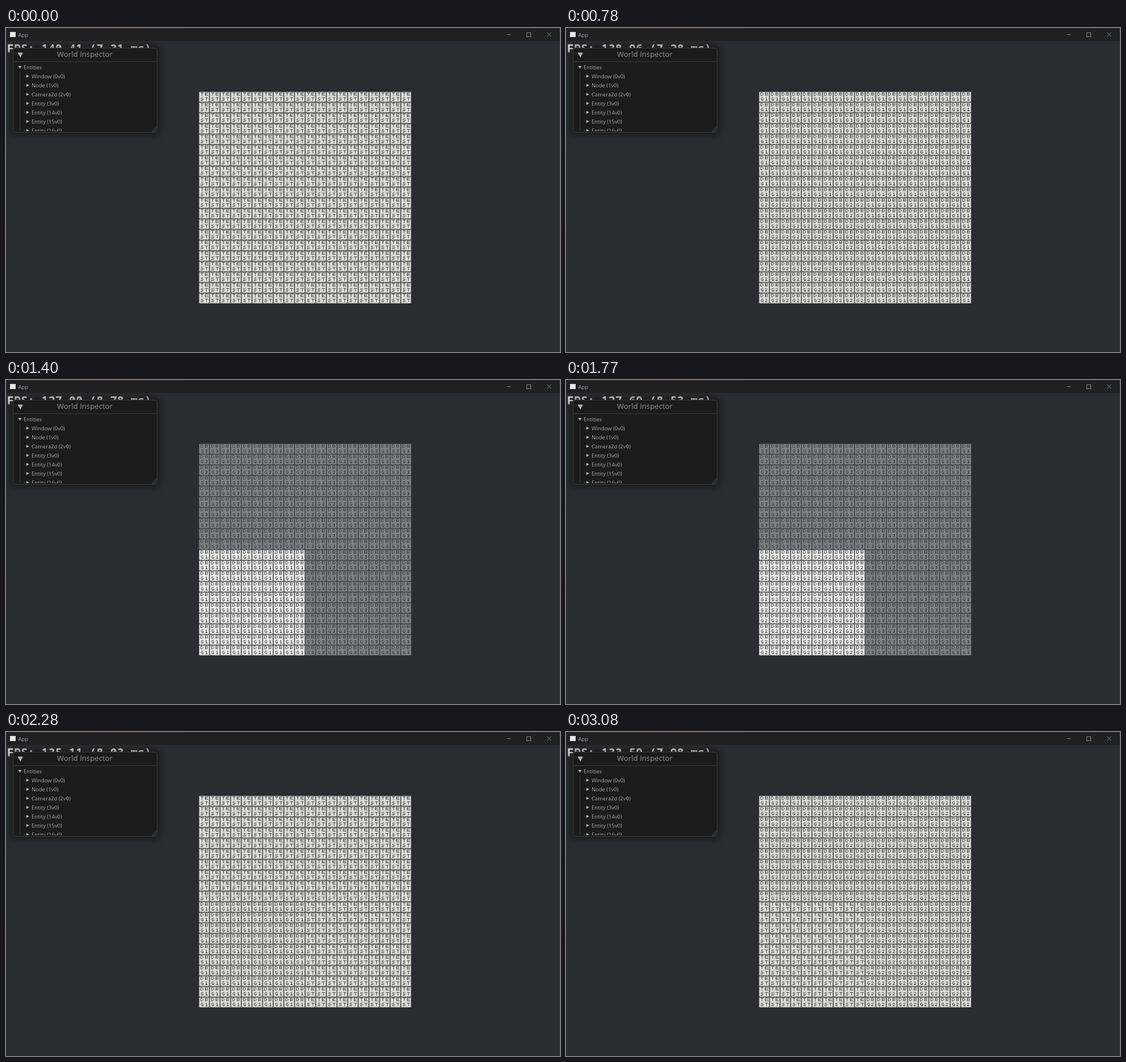
Write an HTML page with a canvas that moves like this. It is 977x573 px and loops after 3100 ms.

```html
<!DOCTYPE html>
<html lang="en">
<head>
<meta charset="utf-8">
<title>App</title>
<style>
  html, body { margin: 0; width: 100%; height: 100%; overflow: hidden; background: #2b2c2f; }
  canvas { display: block; }
</style>
</head>
<body>
<canvas id="stage" width="977" height="573"></canvas>
<script>
const ctx = document.getElementById('stage').getContext('2d');
const LOOP = 3100, PHASE = 130;
const GRID = 20, PITCH = 18.75, TEXEL = PITCH / 24, LEFT = 340, TOP = 112.5;
const UI = '"Open Sans", sans-serif', MONO = '"Noto Sans Mono", monospace';

// Seven rows per glyph, drawn on the 24 x 24 texels of a tile
const GLYPHS = {
  T: ['#######', '   #', '   #', '   #', '   #', '   #', '   #'],
  E: ['#######', '#', '#', '######', '#', '#', '#######'],
  S: ['  ####', ' #', ' #', '  ###', '     #', '     #', '#####'],
  D: ['####', '#   #', '#    #', '#    #', '#    #', '#   #', '####'],
  B: ['#####', '#    #', '#    #', '#####', '#    #', '#    #', '#####'],
  G: ['  ####', ' #', ' #', ' #  ##', ' #   #', ' #   #', '  ####'],
  1: ['  ##', ' # #', '   #', '   #', '   #', '   #', ' #####'],
  2: [' ###', '#   #', '    #', '   #', '  #', ' #', '#####'],
  3: [' ####', ' #  #', '    #', '  ###', '    #', ' #  #', ' ####']
};
const LABELS = ['TEST', 'DBG1', 'DBG2', 'DBG3'];

// k (tenths of a second), frames per second, frame time in ms
const READINGS = [
  [0, 140.41, 7.31], [8, 138.96, 7.28], [13, 124.75, 9.05], [18, 127.69, 8.53],
  [23, 135.11, 8.03], [28, 124.80, 8.88], [31, 133.59, 7.98]
];

function rect(x, y, w, h, color) {
  ctx.fillStyle = color;
  ctx.fillRect(x, y, w, h);
}

function line(color, ...points) {
  ctx.strokeStyle = color;
  ctx.lineWidth = 1;
  ctx.beginPath();
  for (let i = 0; i < points.length; i += 2) ctx.lineTo(points[i], points[i + 1]);
  ctx.stroke();
}

function triangle(color, ...points) {
  ctx.fillStyle = color;
  ctx.beginPath();
  for (let i = 0; i < 6; i += 2) ctx.lineTo(points[i], points[i + 1]);
  ctx.fill();
}

function label(text, x, y, size, color, family = UI, weight = 400) {
  ctx.font = `${weight} ${size}px ${family}`;
  ctx.fillStyle = color;
  ctx.fillText(text, x, y);
}

function fpsText(k) {
  const next = Math.max(1, READINGS.findIndex(r => r[0] >= k));
  const a = READINGS[next - 1], b = READINGS[next];
  const u = (k - a[0]) / (b[0] - a[0]);
  const wobble = Math.sin(Math.PI * u) * Math.sin(k * 2.3);
  const fps = a[1] + (b[1] - a[1]) * u + 4 * wobble;
  const ms = a[2] + (b[2] - a[2]) * u - 0.4 * wobble;
  return `FPS: ${fps.toFixed(2)} (${ms.toFixed(2)} ms)`;
}

function drawWindow() {
  rect(0, 0, 977, 573, '#2b2c2f');
  rect(0, 0, 977, 23, '#202020');
  const top = ctx.createLinearGradient(0, 0, 320, 0);
  top.addColorStop(0, '#2c2626');
  top.addColorStop(0.6, '#4a2424');
  top.addColorStop(1, '#2a2a2a');
  rect(0, 0, 977, 1, top);
  const edge = ctx.createLinearGradient(0, 0, 0, 573);
  [[0, '#303030'], [0.1, '#26393c'], [0.35, '#243844'], [0.57, '#2a323c'],
   [0.61, '#472b2e'], [0.72, '#3e2b2d'], [0.74, '#303134'], [1, '#303134']]
    .forEach(([at, color]) => edge.addColorStop(at, color));
  rect(0, 0, 1, 573, edge);
  rect(976, 0, 1, 573, '#37383a');

  rect(7, 7, 10, 9, '#e4e6e5');
  label('App', 22, 15.5, 9.2, '#a0a0a0');
  line('#858585', 883, 11.5, 890, 11.5);
  ctx.strokeRect(918.5, 8.5, 7, 7);
  line('#858585', 954.5, 8, 961.5, 15);
  line('#858585', 961.5, 8, 954.5, 15);
}

// Soft halo only: the shape itself lies off the stage
function drawHalo(x, y, w, h, spread) {
  ctx.save();
  ctx.shadowColor = 'rgba(0,0,0,.38)';
  ctx.shadowBlur = spread;
  ctx.shadowOffsetX = 2000;
  ctx.fillStyle = '#000';
  ctx.beginPath();
  ctx.roundRect(x - 2000 - spread / 2, y - spread / 2, w + spread, h + spread, 10);
  ctx.fill();
  ctx.restore();
}

function drawInspector() {
  ctx.save();
  ctx.beginPath();
  ctx.rect(0, 23, 977, 550);
  ctx.clip();
  drawHalo(12.5, 35.5, 254, 149, 12);
  ctx.fillStyle = '#1b1b1b';
  ctx.strokeStyle = '#3c3c3c';
  ctx.lineWidth = 1;
  ctx.beginPath();
  ctx.roundRect(12.5, 35.5, 254, 149, 5);
  ctx.fill();
  ctx.stroke();

  triangle('#b4b4b4', 20.5, 43.5, 30, 43.5, 25.2, 52);
  ctx.textAlign = 'center';
  label('World Inspector', 139, 51, 13.2, '#929292');
  ctx.textAlign = 'left';
  line('#3c3c3c', 13, 59.5, 266, 59.5);
  for (const d of [3, 6, 9]) line('#4c4c4c', 266 - d, 183.5, 265.5, 184 - d);

  ctx.beginPath();
  ctx.rect(13, 60, 253, 122.5);
  ctx.clip();
  triangle('#b0b0b0', 21.8, 67, 27.4, 67, 24.6, 72);
  label('Entities', 31, 72.7, 9.45, '#a8a8a8');
  line('#3c3c3c', 24.5, 77, 24.5, 183);
  ['Window (0v0)', 'Node (1v0)', 'Camera2d (2v0)', 'Entity (3v0)',
   'Entity (14v0)', 'Entity (15v0)', 'Entity (16v0)'].forEach((name, i) => {
    const y = 85.3 + 16 * i;
    triangle('#b0b0b0', 36, y - 2.8, 41, y, 36, y + 2.8);
    label(name, 45, y + 3.3, 9.45, '#a8a8a8');
  });
  ctx.restore();
}

function addLabel(path, text, x, y) {
  [...text].forEach((char, i) => {
    const col = i % 2 ? 14 : 4, row = i < 2 ? 2 : 13;
    GLYPHS[char].forEach((bits, r) => {
      for (const run of bits.matchAll(/#+/g)) {
        path.rect(x + (col + run.index) * TEXEL, y + (row + r) * TEXEL,
                  run[0].length * TEXEL, TEXEL);
      }
    });
  });
}

function drawTiles(inQuarter, frame, face, ink, border) {
  const frames = new Path2D(), faces = new Path2D(), text = new Path2D();
  for (let row = 0; row < GRID; row++) {
    for (let col = 0; col < GRID; col++) {
      if ((row >= GRID / 2 && col < GRID / 2) !== inQuarter) continue;
      const x = LEFT + col * PITCH, y = TOP + row * PITCH;
      frames.rect(x, y, PITCH, PITCH);
      faces.rect(x + TEXEL, y + TEXEL, 22 * TEXEL, 22 * TEXEL);
      addLabel(text, LABELS[frame], x, y);
    }
  }
  for (const [path, color] of [[frames, border], [faces, face], [text, ink]]) {
    ctx.fillStyle = color;
    ctx.fill(path);
  }
}

let shown = '';
function draw() {
  const t = performance.now() % LOOP;
  const k = Math.floor((t + 30) / 100);
  const main = Math.floor((t + PHASE) / 500) % 4;
  const quarter = Math.floor((t + PHASE) * 3 / 1000) % 3;
  const state = [k, main, quarter].join();
  if (state !== shown) {
    shown = state;
    const faded = main === 3;
    drawWindow();
    label(fpsText(k), 2, 42.5, 20.2, '#e8e8e8', MONO, 600);
    drawInspector();
    if (faded) drawTiles(false, main, '#7f817f', '#263148', '#3c3d3d');
    else drawTiles(false, main, '#d9dad8', '#262626', '#424242');
    drawTiles(true, quarter, faded ? '#e9e9e9' : '#d9dad8', '#262626', '#424242');
  }
  requestAnimationFrame(draw);
}
draw();
</script>
</body>
</html>
```
